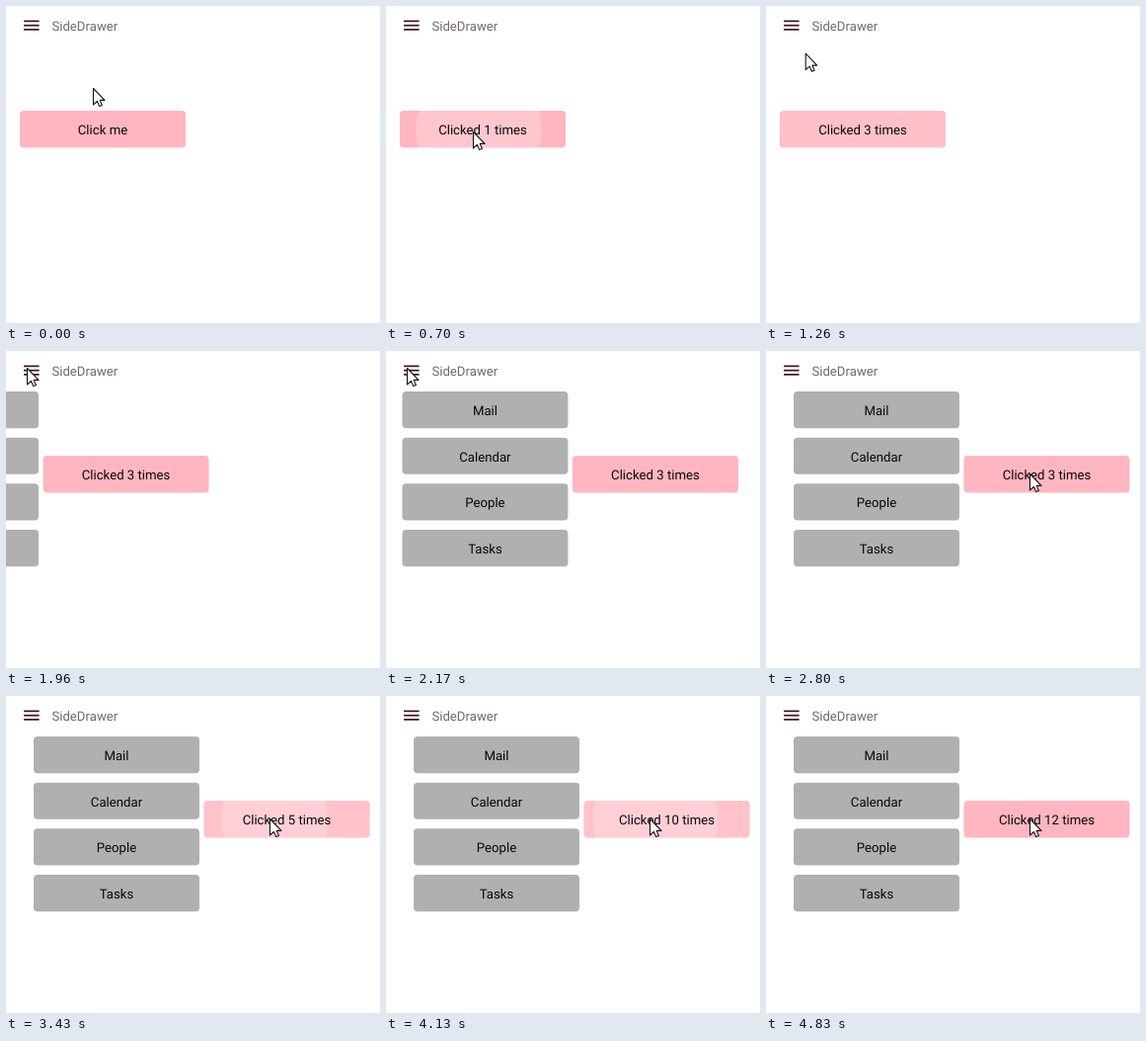
Recreate the animation shown at these times as an HTML page. Size 379 by 321 pixels, loop 5110 ms.

```html
<!DOCTYPE html>
<html lang="en">
<head>
<meta charset="utf-8">
<title>Side drawer</title>
<style>
  html, body { margin: 0; width: 100%; height: 100%; overflow: hidden; background: #fff; }
  svg { display: block; width: 379px; height: 321px; }
  text { font: 13.2px Roboto, sans-serif; text-rendering: geometricPrecision; }
  .label { text-anchor: middle; fill: #080808; }
  .title { fill: #76676b; }
  .menu { fill: #40101d; }
  .item { fill: #b0b0b0; }
  .button { fill: #ffb6c1; }
  .ripple { fill: #fff; }
  .cursor { fill: #fff; stroke: #16101a; stroke-width: 1.1; stroke-linejoin: round; }
</style>
</head>
<body>
<svg viewBox="0 0 379 321" xmlns="http://www.w3.org/2000/svg">
  <defs>
    <clipPath id="buttonClip"><rect x="14" y="106" width="168" height="37.5" rx="4"/></clipPath>
  </defs>
  <g class="menu">
    <rect x="18" y="14.5" width="15.6" height="1.7"/>
    <rect x="18" y="18.8" width="15.6" height="1.7"/>
    <rect x="18" y="23" width="15.6" height="1.7"/>
  </g>
  <text class="title" x="46.4" y="25">SideDrawer</text>
  <g id="drawer"></g>
  <g id="content">
    <rect class="button" x="14" y="106" width="168" height="37.5" rx="4"/>
    <g id="ripples" clip-path="url(#buttonClip)"></g>
    <text id="label" class="label" x="98" y="130"></text>
  </g>
  <path id="cursor" class="cursor" d="M.5 .5V17L4.4 13.4L6.7 18.6L9.4 17.5L7.2 12.4H12Z"/>
</svg>
<script>
const LOOP = 5110, TICK = 70;
const SLIDE = 186.5, SLIDE_START = 1946, SLIDE_TIME = 525;
const RELEASE = 90;
const presses = [600, 790, 980, 2970, 3165, 3350, 3525, 3700, 3865, 4030, 4230, 4425];

const $ = id => document.getElementById(id);
const clamp = v => Math.min(1, Math.max(0, v));
const mix = (a, b, p) => a + (b - a) * p;

function add(parent, tag, attrs, text = '') {
  const el = document.createElementNS('http://www.w3.org/2000/svg', tag);
  for (const key in attrs) el.setAttribute(key, attrs[key]);
  el.textContent = text;
  return parent.appendChild(el);
}

function bezier(x1, y1, x2, y2) {
  const at = (a, b, u) => 3 * a * u * (1 - u) ** 2 + 3 * b * u * u * (1 - u) + u ** 3;
  return x => {
    let lo = 0, hi = 1;
    for (let i = 0; i < 24; i++) {
      const mid = (lo + hi) / 2;
      if (at(x1, x2, mid) < x) lo = mid; else hi = mid;
    }
    return at(y1, y2, hi);
  };
}

const moves = [
  { start: 0, end: 350, from: [88, 83], to: [88, 127], arc: 0, ease: bezier(.4, 0, .5, 1) },
  { start: 1050, end: 1540, from: [88, 127], to: [21, 17], arc: 0, ease: bezier(.25, .1, .25, 1) },
  { start: 2170, end: 2800, from: [21, 17], to: [267, 124], arc: 9, ease: bezier(.3, 0, .5, 1) }
];

['Mail', 'Calendar', 'People', 'Tasks'].forEach((name, i) => {
  const y = 41 + i * 46.65;
  add($('drawer'), 'rect', { class: 'item', x: 28, y, width: 168, height: 37.2, rx: 4 });
  add($('drawer'), 'text', { class: 'label', x: 112, y: y + 24 }, name);
});

const ripples = presses.map(() => add($('ripples'), 'circle', { class: 'ripple', cy: 125 }));

function drawCursor(t) {
  const move = moves.filter(m => t >= m.start).pop();
  const p = move.ease(clamp((t - move.start) / (move.end - move.start)));
  const x = mix(move.from[0], move.to[0], p);
  const y = mix(move.from[1], move.to[1], p) - move.arc * Math.sin(Math.PI * p);
  $('cursor').setAttribute('transform', `translate(${x.toFixed(1)} ${y.toFixed(1)})`);
}

function drawSlide(t) {
  const p = 1 - (1 - clamp((t - SLIDE_START) / SLIDE_TIME)) ** 5;
  $('content').setAttribute('transform', `translate(${SLIDE * p} 0)`);
  $('drawer').setAttribute('transform', `translate(${SLIDE * (p - 1)} 0)`);
  $('drawer').setAttribute('visibility', p > 0 ? 'visible' : 'hidden');
}

function drawRipples(t) {
  ripples.forEach((ripple, i) => {
    const age = t - presses[i];
    const grow = clamp(age / 225);
    const x = presses[i] < SLIDE_START ? 88 : 80.5;
    ripple.setAttribute('cx', x + 14 * grow);
    ripple.setAttribute('r', 88 * (1 - (1 - grow) ** 2.2));
    ripple.setAttribute('opacity', .21 * clamp(age / 60) * clamp((400 - age) / 180));
  });
}

function drawLabel(t) {
  const count = presses.filter(press => t >= press + RELEASE).length;
  $('label').textContent = count ? `Clicked ${count} times` : 'Click me';
}

const begin = performance.now();
function frame() {
  const elapsed = (performance.now() - begin) % LOOP;
  const t = Math.floor(elapsed / TICK) * TICK;
  drawSlide(t);
  drawRipples(t);
  drawLabel(t);
  drawCursor(t);
  requestAnimationFrame(frame);
}
frame();
</script>
</body>
</html>
```
